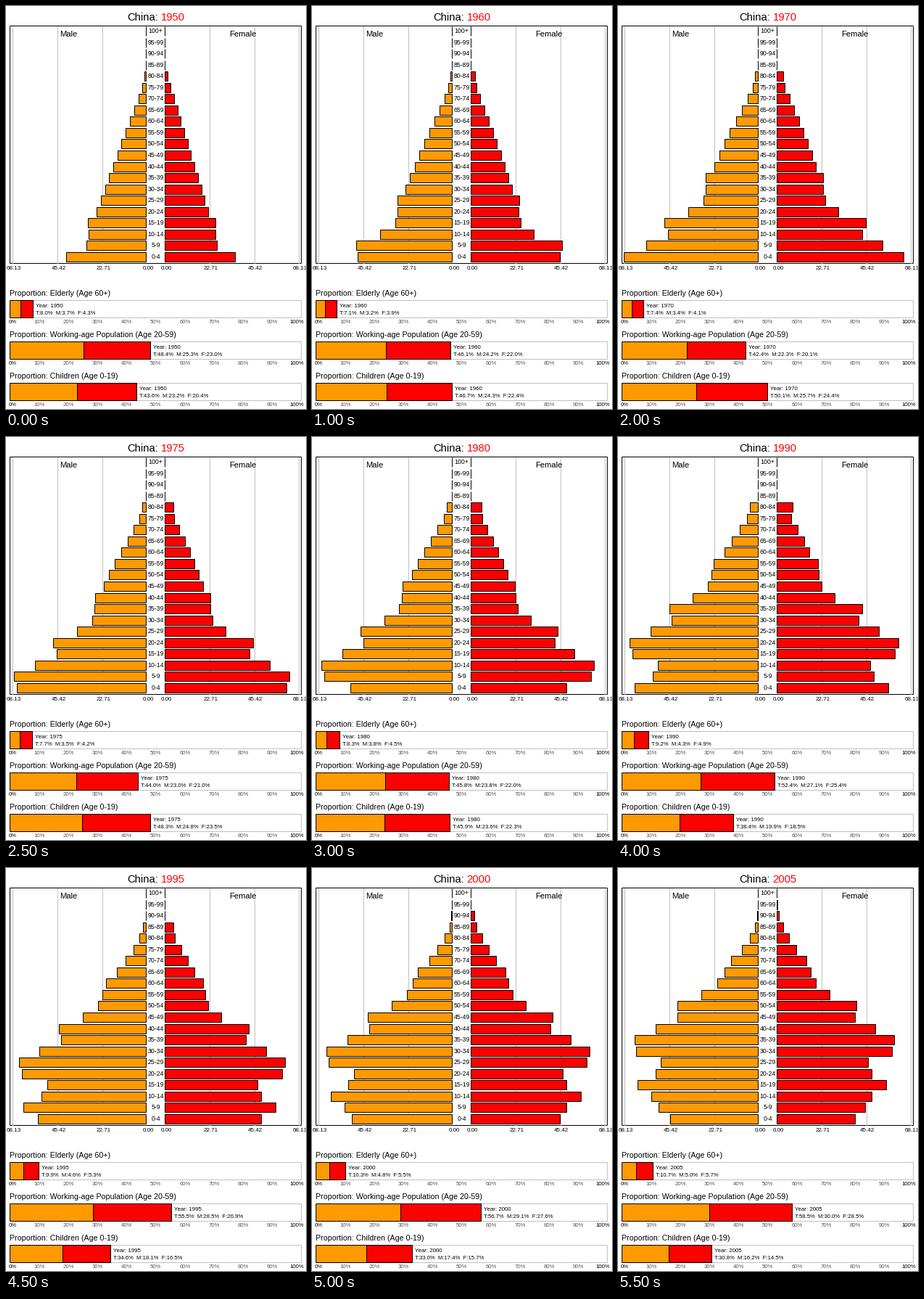
A matplotlib script that plays this animation: 414 px wide and 555 px high, repeating every 8000 ms.

```python
import math

import matplotlib.pyplot as plt
import numpy as np
from matplotlib.animation import FuncAnimation
from matplotlib.patches import Rectangle

W, H = 414, 555
ORANGE, RED, GRID = "#ff9900", "#ff0000", "#c0c0c0"
AGES = 21
START, END = 1950, 2005
MALE_X, FEMALE_X = 193, 219
TRACK_X, TRACK_W = 5, 402

# Size in pixels of each five-year male birth cohort, 1935 to 2005.
BIRTHS = [80, 79, 82, 110, 140, 130, 158, 185, 178, 140, 146, 170, 149, 138, 121]


def survival(i, year, risk):
    """Share of age group i alive five years later; mortality falls with time."""
    era = 1 + 1.2 * math.exp((START - year) / 10)
    infant = 0.05 * (era - 1) if i == 0 else 0
    ageing = risk * 0.000665 * math.exp(0.45 * i)
    return math.exp(-0.006 * era ** 2 - infant - era * ageing)


def project(births, adults, risk):
    """Age the starting pyramid in five-year steps; the oldest group is open."""
    row = births[3::-1] + adults
    row += [0] * (AGES - len(row))
    rows = {START: row}
    for k, year in enumerate(range(START + 5, END + 1, 5)):
        top = 16 if year < 1995 else 20
        new = [births[4 + k]] + [0] * (AGES - 1)
        for i, n in enumerate(row):
            new[min(i + 1, top)] += n * survival(i, year - 5, risk)
        rows[year] = row = new
    return rows


def girls_per_boy(year):
    return np.interp(year, [1950, 1955, 1980, 1995], [0.88, 0.95, 0.94, 0.89])


girls = [n * girls_per_boy(1935 + 5 * k) for k, n in enumerate(BIRTHS)]
male = project(BIRTHS, [max(2, 68 - 5.75 * k) for k in range(13)], 1)
female = project(girls, [max(4, 60 - 4.7 * k) for k in range(13)], 0.65)

plt.rcParams["font.family"] = "Liberation Sans"
fig = plt.figure(figsize=(W / 72, H / 72), dpi=72, facecolor="white")
ax = fig.add_axes([0, 0, 1, 1])
# Whole coordinates snap to the pixel of the same number.
ax.set_xlim(-0.25, W - 0.25)
ax.set_ylim(H - 0.75, -0.75)
ax.axis("off")


def text(x, y, s, size, color="black", ha="left"):
    return ax.text(x, y - 0.5, s, size=size, color=color, ha=ha, va="baseline")


def box(x, y, w, h, fill, edge="black", z=3):
    patch = Rectangle((x, y), w, h, fc=fill, ec=edge, lw=1, zorder=z)
    ax.add_patch(patch)
    return patch


def build_pyramid():
    box(5, 26, 402, 327, "white", z=1)
    text(74, 42, "Male", 11.2)
    text(308, 42, "Female", 11.2)
    for k in range(4):
        value = f"{22.71 * k:.2f}"
        left, right = 195 - 62 * k, 220 + 61.5 * k
        if k:
            for x in (left, right):
                ax.plot([int(x)] * 2, [27, 353], color=GRID, lw=1, zorder=2)
        text(left + 1.5, 363, value, 8, ha="center")
        text(right + 0.7, 363, value, 8, ha="center")
    bars = []
    for i in range(AGES):
        top = round(338 - 15.55 * i)
        label = "100+" if i == 20 else f"{5 * i}-{5 * i + 4}"
        text(206.3, top + 10, label, 8.7, ha="center")
        bars.append((box(MALE_X, top, 0, 13, ORANGE), box(FEMALE_X, top, 0, 13, RED)))
    return bars


class Share:
    """A percentage track for some age groups, with two bars and a caption."""

    def __init__(self, y, title, groups):
        self.groups = groups
        text(5, y - 5, title, 10.6)
        box(TRACK_X, y, TRACK_W, 24, "white", GRID, z=1)
        for k in range(11):
            x = np.clip(TRACK_X + 0.5 + k * TRACK_W / 10, 9, 401)
            color = "#555555" if 0 < k < 10 else "black"
            text(x, y + 33, f"{10 * k}%", 7.8, color, "center")
        self.m = box(TRACK_X, y, 0, 24, ORANGE)
        self.f = box(TRACK_X, y, 0, 24, RED)
        self.year = text(0, y + 11, "", 7.9)
        self.note = text(0, y + 21, "", 7.8)

    def update(self, year):
        total = sum(male[year]) + sum(female[year])
        m, f = (100 * sum(sex[year][self.groups]) / total for sex in (male, female))
        mid = round(m * TRACK_W / 100)
        end = round((m + f) * TRACK_W / 100)
        self.m.set_width(mid)
        self.f.set_x(TRACK_X + mid)
        self.f.set_width(end - mid)
        self.year.set_text(f"Year: {year}")
        self.note.set_text(f"T:{m + f:.1f}%  M:{m:.1f}%  F:{f:.1f}%")
        for label in (self.year, self.note):
            label.set_x(TRACK_X + end + 3.5)


text(167.5, 20, "China:", 14.7)
year_text = text(213.5, 20, "", 14.7, RED)
bars = build_pyramid()
shares = [
    Share(404, "Proportion: Elderly (Age 60+)", slice(12, None)),
    Share(461, "Proportion: Working-age Population (Age 20-59)", slice(4, 12)),
    Share(518, "Proportion: Children (Age 0-19)", slice(0, 4)),
]


def draw(i):
    year = min(START + 5 * i, END)
    year_text.set_text(str(year))
    for (left, right), m, f in zip(bars, male[year], female[year]):
        left.set_x(MALE_X - round(m))
        left.set_width(round(m))
        right.set_width(round(f))
    for share in shares:
        share.update(year)
    return []


anim = FuncAnimation(fig, draw, frames=16, interval=500, init_func=lambda: draw(0),
                     repeat=True, repeat_delay=0, blit=False)
plt.show()
```
